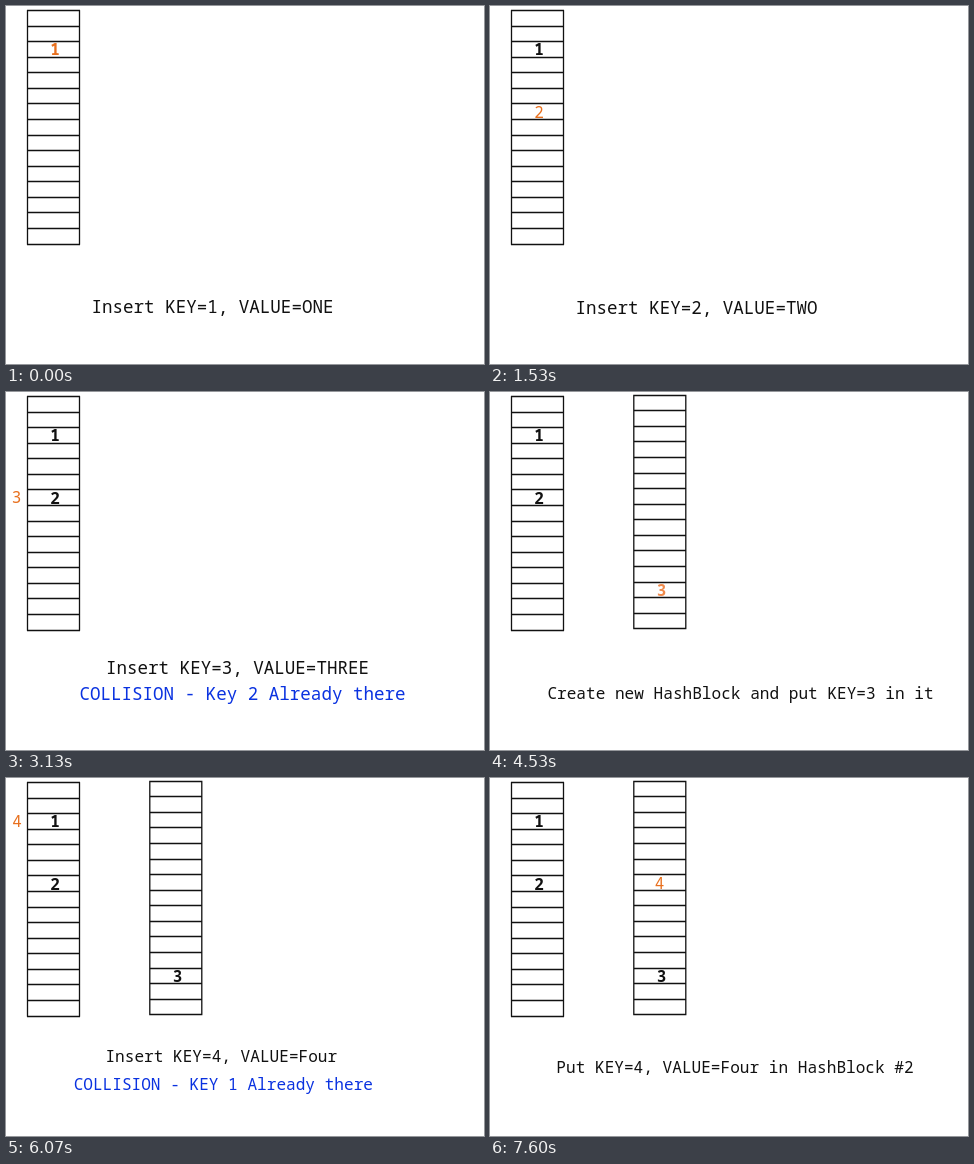
Write an HTML page that moves like this. It is 478 px wide and 358 px high and loops after 8000 ms.

```html
<!DOCTYPE html>
<html lang="en">
<head>
<meta charset="utf-8">
<title>Hash block insertion</title>
<style>
html, body { margin: 0; width: 100%; height: 100%; overflow: hidden; background: #fff; }
svg { display: block; width: 100%; height: 100%; }
text { font-family: "Noto Sans Mono", "DejaVu Sans Mono", monospace; text-anchor: middle; white-space: pre; }
.bold { font-weight: 700; }
path { fill: none; stroke: #111; stroke-width: 1.3; }
</style>
</head>
<body>
<svg id="stage" viewBox="0 0 478 358"></svg>
<script>
const LOOP = 8000, ROWS = 15, ROW_H = 15.57;
const BLACK = '#111', BLUE = '#0a32e0', ORANGE = '#e8701e', PALE = '#f08a4b';
const LARGE = 17.55, SMALL = 16.1;
const stage = document.getElementById('stage');

function add(parent, tag, attrs, content = '') {
  const node = document.createElementNS('http://www.w3.org/2000/svg', tag);
  for (const key in attrs) node.setAttribute(key, attrs[key]);
  node.textContent = content;
  return parent.appendChild(node);
}

function block(parent, x, y) {
  let d = `M${x} ${y}V${y + ROWS * ROW_H}M${x + 52} ${y}V${y + ROWS * ROW_H}`;
  for (let i = 0; i <= ROWS; i++) {
    d += `M${x - 0.6} ${Math.round(y + i * ROW_H - 0.5) + 0.5}h53.2`;
  }
  add(parent, 'path', { d });
}

const digit = (n, x, y, fill = BLACK, bold = true) =>
  ({ content: n, x, y, fill, size: 16, bold });
const line = (content, x, y, size, fill = BLACK) =>
  ({ content, x, y, fill, size });

const one = digit('1', 49, 49), two = digit('2', 49, 111.5), three = digit('3', 171.5, 204);

const scenes = [
  { at: 0, blocks: 1, texts: [
    digit('1', 49, 49, ORANGE),
    line('Insert KEY=1, VALUE=ONE', 206.5, 307, LARGE)] },
  { at: 1530, blocks: 1, texts: [
    one, digit('2', 49, 111.5, ORANGE, false),
    line('Insert KEY=2, VALUE=TWO', 206.5, 308, LARGE)] },
  { at: 3000, blocks: 1, texts: [
    one, two, digit('3', 10.5, 111, ORANGE, false),
    line('Insert KEY=3, VALUE=THREE', 231.5, 282, LARGE),
    line('COLLISION - Key 2 Already there', 236.5, 307.5, LARGE, BLUE)] },
  { at: 4530, blocks: 2, texts: [
    one, two, digit('3', 171.5, 204, PALE),
    line('Create new HashBlock and put KEY=3 in it', 250.5, 307, SMALL)] },
  { at: 6000, blocks: 2, texts: [
    one, two, three, digit('4', 11, 49, ORANGE, false),
    line('Insert KEY=4, VALUE=Four', 215.3, 284, SMALL),
    line('COLLISION - KEY 1 Already there', 217.3, 312, SMALL, BLUE)] },
  { at: 7530, blocks: 2, texts: [
    one, two, three, digit('4', 169.5, 111, ORANGE, false),
    line('Put KEY=4, VALUE=Four in HashBlock #2', 245, 295, SMALL)] }
];

const groups = scenes.map(scene => {
  const group = add(stage, 'g', { visibility: 'hidden' });
  block(group, 21.5, 4.5);
  if (scene.blocks > 1) block(group, 143.8, 3.2);
  for (const { content, x, y, fill, size, bold } of scene.texts) {
    add(group, 'text', { x, y, fill, 'font-size': size, class: bold ? 'bold' : '' }, content);
  }
  return group;
});

const start = performance.now();
function draw() {
  const t = (performance.now() - start) % LOOP;
  const current = scenes.findLastIndex(scene => scene.at <= t);
  groups.forEach((group, i) =>
    group.setAttribute('visibility', i === current ? 'visible' : 'hidden'));
  requestAnimationFrame(draw);
}
draw();
</script>
</body>
</html>
```
